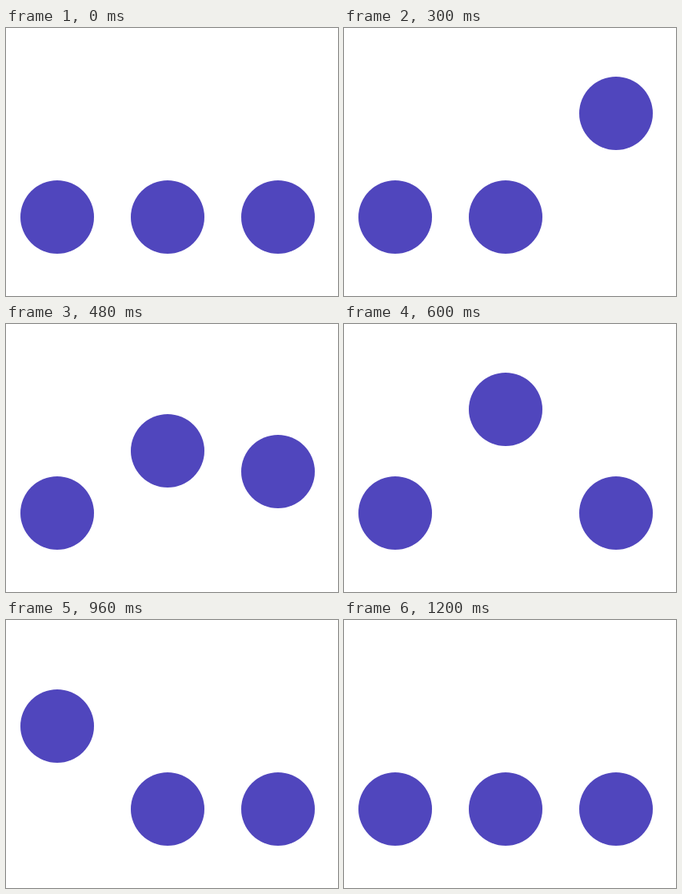
These frames come from a looping animation (415x336 px, 1.33 s). An HTML page:

```html
<!DOCTYPE html>
<html lang="en">
<head>
<meta charset="utf-8">
<title>Bouncing dots</title>
<style>
  html, body { margin: 0; width: 100%; height: 100%; overflow: hidden; background: #fff; }
  svg { display: block; width: 100vw; height: 100vh; }
</style>
</head>
<body>
<svg viewBox="0 0 415 336" fill="#5046bd">
  <circle cx="340" cy="237" r="46"/>
  <circle cx="202" cy="237" r="46"/>
  <circle cx="64" cy="237" r="46"/>
</svg>
<script>
  const LOOP = 1330, TICK = 30, LAST = 40;
  const FLOOR = 237, RISE = 13, HALF = 10;
  const dots = document.querySelectorAll('circle');

  // Each dot rises and falls linearly, starting when the previous one peaks.
  function draw(ms) {
    const tick = Math.min(LAST, Math.floor((ms % LOOP + 0.01) / TICK));
    dots.forEach((dot, i) => {
      const peak = HALF * (i + 1);
      const height = Math.max(0, HALF - Math.abs(tick - peak));
      dot.setAttribute('cy', FLOOR - RISE * height);
    });
  }

  function loop(now) {
    draw(now);
    requestAnimationFrame(loop);
  }

  draw(0);
  requestAnimationFrame(loop);
</script>
</body>
</html>
```
